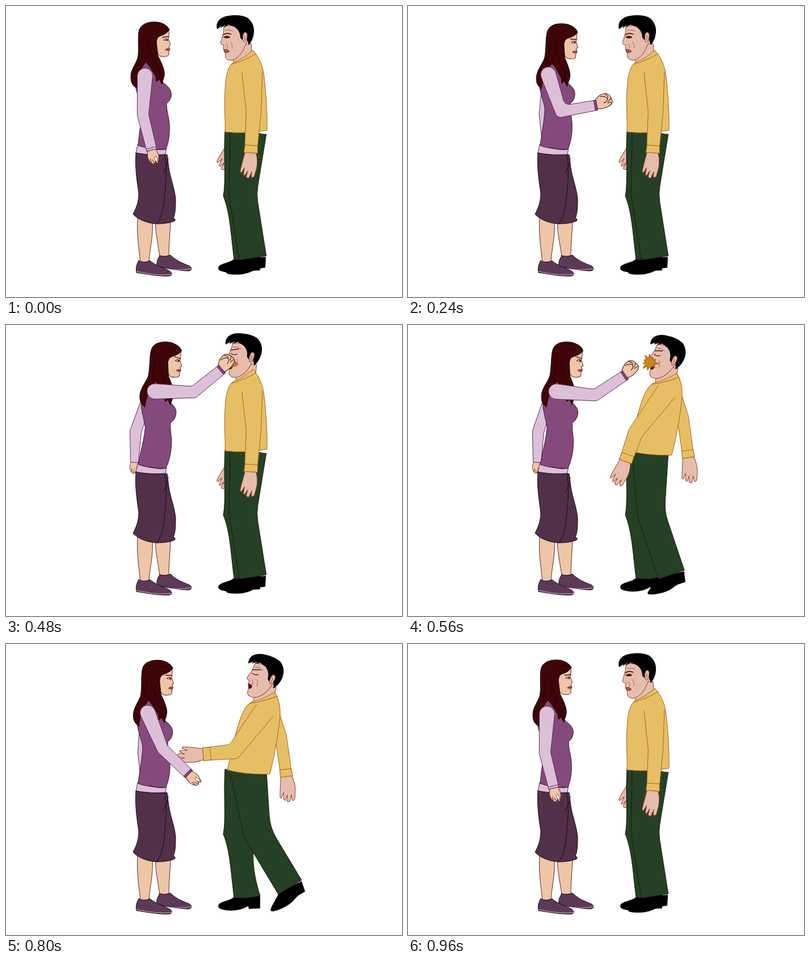
Write an HTML page with a canvas that moves like this. It is 698 by 513 pixels and loops after 1200 ms.

```html
<!DOCTYPE html>
<html lang="en">
<head>
<meta charset="utf-8">
<title>Two people</title>
<style>
html, body { margin: 0; width: 100%; height: 100%; overflow: hidden; background: #fff; }
canvas { display: block; }
</style>
</head>
<body>
<canvas id="stage" width="698" height="513"></canvas>
<script>
const ctx = document.getElementById('stage').getContext('2d');
const LOOP = 1200, STEP = 40, RAD = Math.PI / 180;

const C = {
  hair: '#3f0508', skin: '#efc5a8', skinLine: '#5e2a24',
  top: '#854a7c', topLine: '#43163c', sleeve: '#dcc0d8', sleeveLine: '#5d2a55',
  skirt: '#52304a', skirtLine: '#1c0616', shoe: '#5c3a57', sole: '#d9b3cc',
  face: '#e6bdac', faceLine: '#8f4038',
  knit: '#e6bf64', knitLine: '#a8641c', cloth: '#254024', clothLine: '#1c1c0c'
};

// Shoulder x, y, upper arm angle, forearm angle, head x, y, head tilt
const REST = [245, 123, 93, 76, 0, 0, 0];
const RAISED = [240, 123, 106, 4, 3, 3, 3];
const HIT = [262, 117, 1, -39, 18, 1, 4];

const mix = (a, b, k) => a + (b - a) * k;
const blend = (a, b, k) => a.map((v, i) => mix(v, b[i], k));
const ramp = (t, a, b) => Math.min(1, Math.max(0, (t - a) / (b - a)));
const smooth = (t, a, b) => {
  const u = ramp(t, a, b);
  return u * u * (3 - 2 * u);
};
const polar = ([x, y], deg, len) => [x + len * Math.cos(deg * RAD), y + len * Math.sin(deg * RAD)];

function joints(x, y, deg1, len1, deg2, len2) {
  const mid = polar([x, y], deg1, len1);
  return [[x, y], mid, polar(mid, deg2, len2)];
}

function draw(d, fill, line, width = 1) {
  const p = new Path2D(d);
  if (fill) { ctx.fillStyle = fill; ctx.fill(p); }
  if (line) { ctx.strokeStyle = line; ctx.lineWidth = width; ctx.stroke(p); }
}

function at([x, y], deg, paint) {
  ctx.save();
  ctx.translate(x, y);
  ctx.rotate(deg * RAD);
  paint();
  ctx.restore();
}

function about(px, py, dx, dy, deg, paint) {
  at([px + dx, py + dy], deg, () => { ctx.translate(-px, -py); paint(); });
}

function skewed(a, b, c, d, e, f, paint) {
  ctx.save();
  ctx.transform(a, b, c, d, e, f);
  paint();
  ctx.restore();
}

// Two tapered bones with half widths at the three joints
function limb([s, e, w], [ws, we, ww], fill, line, { round = false, bend = 10 } = {}) {
  const normal = (a, b) => {
    const l = Math.hypot(b[0] - a[0], b[1] - a[1]);
    return [(a[1] - b[1]) / l, (b[0] - a[0]) / l];
  };
  const n = normal(s, e), m = normal(e, w);
  const q = 1 + Math.max(-0.3, n[0] * m[0] + n[1] * m[1]);
  const miter = [(n[0] + m[0]) / q, (n[1] + m[1]) / q];
  const off = (p, v, r) => [p[0] + v[0] * r, p[1] + v[1] * r];
  ctx.beginPath();
  ctx.moveTo(...off(s, n, ws));
  ctx.arcTo(...off(e, miter, we), ...off(w, m, ww), bend);
  ctx.lineTo(...off(w, m, ww));
  ctx.lineTo(...off(w, m, -ww));
  ctx.arcTo(...off(e, miter, -we), ...off(s, n, -ws), bend);
  ctx.lineTo(...off(s, n, -ws));
  if (round) {
    const ang = Math.atan2(e[1] - s[1], e[0] - s[0]);
    ctx.arc(...s, ws, ang - Math.PI / 2, ang - Math.PI * 1.5, true);
  }
  ctx.fillStyle = fill;
  ctx.fill();
  ctx.strokeStyle = line;
  ctx.lineWidth = 1;
  ctx.stroke();
}

function hisArm(x, y, upper, len1, fore, len2, widths) {
  const arm = joints(x, y, upper, len1, fore, len2), r = widths[2];
  at(arm[2], fore, () =>
    draw('M-1-9C10-13 20-13 27-12L41-9Q45-6 42-4L33-4L44 0Q46 4 42 5L32 3L41 8Q40 11 36 10L27 9L36 14Q36 17 32 16C24 15 10 12-1 10Z', C.face, C.faceLine));
  limb(arm, widths, C.knit, C.knitLine);
  at(arm[2], fore, () => draw(`M-13 ${-r}L0 ${-r - 1}L0 ${r + 1}L-13 ${r}Z`, C.knit, C.knitLine));
}

function hisHead(hurt) {
  draw('M399 88L402 104L434 96L432 66L412 68Z', C.face, C.faceLine);
  draw('M384 36L383 48L378 65Q379 69 384 69L383 75L386 81L387 91Q391 97 400 95Q410 92 418 78L426 60L415 32Z', C.face, C.faceLine);
  draw('M372 41C369 28 377 21 388 18C402 15 418 16 426 21C435 28 438 38 437 47C436 57 432 64 428 69L425 60Q424 48 419 47L417 60L413 56C413 48 410 42 403 37L392 33L384 38L387 33L378 39L380 35Z', '#000');
  draw('M418 50Q421 43 425 49Q426 60 420 64Q416 62 418 50ZM420 52Q423 54 420 60', C.face, C.faceLine);
  draw(hurt ? 'M383 49L396 45' : 'M383 51Q389 46 397 50', null, '#200', 1.3);
  draw('M386 43Q392 41 400 44M388 66Q392 70 390 75M396 63Q399 67 399 74', null, C.faceLine, 0.7);
  if (hurt) {
    draw('M384 55Q390 58 395 54', null, '#511', 1.2);
    draw('M384 75Q389 73 391 78Q390 83 386 82Z', '#4c1512', '#7d2b24');
  } else {
    draw('M384 55Q389 51 395 55Q389 58 384 55Z', '#6c2520', '#300');
    draw('M384 77Q389 75 394 80Q390 83 386 82Z', '#a05a44', '#70281c');
  }
}

function man(t) {
  const back = 1 - smooth(t, 800, 960);
  const jolt = ramp(t, 440, 480) * back, lean = ramp(t, 480, 560) * back;
  const stride = (1 - (1 - ramp(t, 480, 800)) ** 2) * back;

  hisArm(mix(425, 468, lean), 112, mix(94, 72, lean), mix(78, 53, lean), mix(110, 82, lean), mix(61, 72, lean), [10, 10, 10]);

  draw('M375 459C380 453 394 453 402 446L448 443L448 466L428 467L427 462C415 470 395 472 381 468C374 466 373 463 375 459Z', '#000');
  draw('M386 221L450 225C440 260 435 330 436 366C434 395 442 425 448 444L425 448L402 447C396 400 395 365 383 335C388 310 383 260 386 221Z', C.cloth, C.clothLine);
  const shin = 81 - 22 * stride;
  const leg = joints(427, 223, 95 - 13 * stride, 110, shin, 113);
  at(leg[2], shin - 81, () =>
    draw('M-45 22C-37 14-27 8-21 1L23-2L22 17L8 19L3 21C-10 29-25 30-38 29C-47 28-49 26-45 22Z', '#000'));
  limb(leg, [32, 24, 24], C.cloth, C.clothLine, { bend: 90 });

  about(415, 95, 5 * jolt + 31 * lean, 4 * lean, 10 * jolt + 8 * lean, () => hisHead(jolt > 0.6));
  const tilt = 0.14 * lean, slide = 0.24 * lean;
  skewed(1, tilt, -slide, 1, 222 * slide + 4 * lean, -386 * tilt, () => {
    draw('M400 100C390 108 387 125 386 150C384 175 387 200 386 222Q420 226 460 219C461 190 458 150 455 125C453 105 446 90 435 78Q420 92 400 100Z', C.knit, C.knitLine);
    draw('M397 103Q424 95 441 84', null, C.knitLine);
  });
  hisArm(mix(434, 456, lean), 117, mix(88, 127, lean), mix(70, 91, lean), 94 + 81 * stride ** 2, mix(72, 54, lean), [18, 13, 11]);
}

function herHand(fist) {
  if (fist) {
    draw('M-1-7C6-13 12-14 18-13C25-12 29-7 28 0C29 8 24 11 18 11C10 12 6 9-1 7Z', C.skin, '#301010');
    draw('M12-11Q20-9 22-2Q20 3 13 2M22-11Q26-4 22-2M28 0L21 3M26 7L19 5', null, '#301010');
  } else {
    draw('M-1-7C6-9 10-11 15-9L24-6C26-4 24-2 20-2L24 0C26 5 20 9 12 10C6 10 3 9-1 7Z', C.skin, C.skinLine);
    draw('M12-5L22-6L21-2L15-1Z', '#fff', C.skinLine, 0.7);
    draw('M24 1L17 3M21 6L14 6', null, C.skinLine);
  }
}

function herHead(anger) {
  draw('M266 50L286 41C288 48 287 53 286 58L290 68L287 71L289 76L287 80L287 86C284 90 276 90 271 88L264 80Z', C.skin, C.skinLine);
  draw(`M276 ${55 - anger * 2}L287 ${54 + anger * 2}`, null, '#4a1010', 1.4);
  draw('M278 60Q282 56 286 60Q282 62 278 60Z', '#fff', '#401030');
  draw('M283 58L284 61', null, '#302050', 1.8);
  draw('M281 77Q285 73 289 76Q286 81 281 77Z', '#a5405c', '#6a1c34', 0.7);
  draw('M288 42C285 34 274 28 262 28C248 28 236 33 234 46C232 60 235 80 232 92C228 104 220 112 220 125C220 135 223 140 230 145C231 130 236 112 246 99C252 104 258 114 264 124L265 133L270 129L275 138C276 130 280 125 279 117C278 108 273 98 268 88L265 64C266 56 268 54 274 52C280 50 284 47 288 42Z', C.hair, '#1a0000');
  draw('M250 62Q254 88 268 108Q273 118 270 129M241 58Q244 82 234 104M284 40Q270 35 258 46', null, '#220202', 0.8);
}

function herLegs() {
  draw('M232 374C230 400 234 425 237 452L252 451C253 430 260 405 258 380Z', C.skin, C.skinLine);
  draw('M263 380C264 405 269 425 271 442L287 441C287 420 289 405 290 380Z', C.skin, C.skinLine);
  draw('M271 440Q280 443 290 439C298 448 312 454 323 458C329 462 328 466 322 467C305 467 285 463 266 459C265 450 268 445 271 440Z', C.shoe, C.skirtLine);
  draw('M267 460C285 465 305 467 327 463', null, C.sole);
  draw('M234 449Q243 454 254 449C262 457 277 461 288 467C294 471 293 475 288 476C270 477 250 473 230 470C228 461 231 454 234 449Z', C.shoe, C.skirtLine);
  draw('M230 468C250 472 270 476 292 473', null, C.sole);
}

function woman(t) {
  const raise = ramp(t, 40, 120), strike = ramp(t, 120, 480), ret = smooth(t, 500, 960);
  const [x, y, upper, fore, hx, hy, tilt] =
    blend(blend(blend(REST, RAISED, raise), HIT, strike), REST, ret);
  const reach = strike * (1 - ret), lean = 0.09 * reach;
  const fist = t >= 160 && t < 760;

  const farFore = 85 + 7 * reach;
  const far = joints(245, 140, 87 + 22 * reach, 51, farFore, mix(48, 54, reach));
  at(far[2], farFore, () => {
    ctx.scale(0.8, 0.8);
    herHand(false);
  });
  limb(far, [9, 10, 7], C.sleeve, C.sleeveLine, { round: true });

  herLegs();
  draw('M232 244L229 260Q255 264 281 262L283 249Z', C.sleeve, C.sleeveLine);
  draw('M229 259C227 285 231 310 234 330C234 345 230 355 224 367C232 376 248 383 265 384C280 384 290 382 297 379C300 376 296 374 295 374C299 365 299 352 299 340C297 320 290 305 287 285L284 262Q255 264 229 259Z', C.skirt, C.skirtLine);
  draw('M280 262C285 290 281 320 278 350Q275 372 266 384M286 268Q284 285 277 294', null, C.skirtLine);

  skewed(1, 0, -lean, 1, lean * 250, 0, () =>
    draw('M247 97C236 103 229 118 228 135C228 150 236 165 239 180C240 200 234 225 233 246Q255 254 282 252C287 240 289 225 288 208C287 195 283 185 283 172C291 166 293 157 290 149C286 140 276 136 271 128L264 108Z', C.top, C.topLine));
  draw('M253 249Q265 255 281 253', null, C.topLine);

  about(250, 95, hx, hy, tilt, () => herHead(reach));
  const arm = joints(x, y, upper, 69, fore, 64);
  at(arm[2], fore - (fist ? 16 : 0), () => herHand(fist));
  limb(arm, [13.5, 10, 9], C.sleeve, C.sleeveLine, { round: true });
  at(arm[2], fore, () => draw('M-4-9L0-9L0 9L-4 9Z', raise * (1 - ret) ? C.top : C.sleeve, C.sleeveLine));
}

function burst(t) {
  if (t < 480 || t >= 680) return;
  const k = ramp(t, 480, 560), size = mix(9, 16, k), spikes = 11;
  at([mix(400, 426, k), mix(68, 66, k)], 8, () => {
    ctx.beginPath();
    for (let i = 0; i < spikes * 2; i++) {
      const r = size * (i % 2 ? 0.5 : 0.82 + 0.18 * Math.cos(i * 2.3));
      ctx.lineTo(...polar([0, 0], i * 180 / spikes, r));
    }
    ctx.closePath();
    ctx.fillStyle = '#cc861c';
    ctx.fill();
    ctx.strokeStyle = '#8f560e';
    ctx.lineWidth = 1;
    ctx.stroke();
  });
}

function render(now) {
  const t = Math.floor(now % LOOP / STEP) * STEP;
  ctx.fillStyle = '#fff';
  ctx.fillRect(0, 0, 698, 513);
  ctx.lineJoin = ctx.lineCap = 'round';
  man(t);
  burst(t);
  woman(t);
}

const start = performance.now();
function tick() {
  render(performance.now() - start);
  requestAnimationFrame(tick);
}
tick();
</script>
</body>
</html>
```
